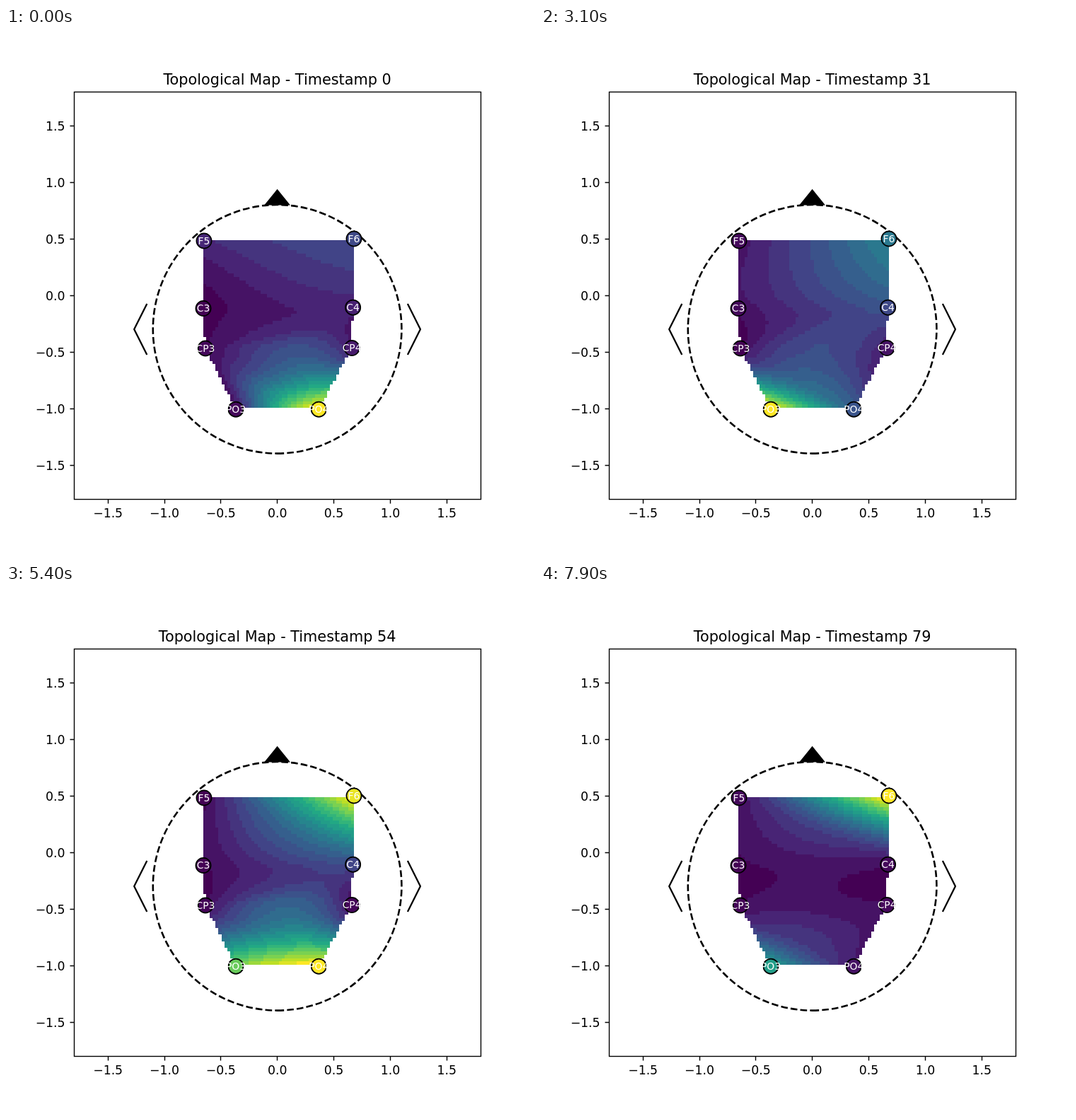
These frames come from a looping animation (748 by 748 pixels, 8000 ms). An HTML page with a canvas:

```html
<!DOCTYPE html>
<html lang="en">
<head>
<meta charset="utf-8">
<title>Topological Map</title>
<style>
  html, body { margin: 0; width: 100%; height: 100%; overflow: hidden; background: #fff; }
  canvas, svg { position: absolute; left: 0; top: 0; width: 748px; height: 748px; }
  text { font-family: "DejaVu Sans", sans-serif; font-size: 17.3px; text-anchor: middle; }
  .end { text-anchor: end; }
  .title { font-size: 20.8px; }
  .name { font-size: 13.85px; fill: #fff; }
  .line { fill: none; stroke: #000; }
</style>
</head>
<body>
<canvas id="heat" width="748" height="748"></canvas>
<svg id="plot" viewBox="0 0 748 748">
  <rect class="line" x="96.5" y="90.5" width="575" height="576" stroke-width="1.39"/>
  <path class="line" d="M383.6 601.6A175.8 175.8 0 0 0 383.6 250A175.8 175.8 0 0 0 383.6 601.6" stroke-width="2.6" stroke-dasharray="9.61 4.15"/>
  <path d="M365.2 250.5L383.6 227.8L402 250.5Z"/>
  <path class="line" d="M199.3 389.9L181.2 425.9L199.3 461.9M567.9 389.9L585.9 425.9L567.9 461.9" stroke-width="2.3" stroke-linejoin="round"/>
  <text id="title" class="title" x="383.6" y="80"></text>
</svg>
<script>
const names = ["F5", "F6", "C3", "C4", "CP3", "CP4", "PO3", "PO4"];
const pts = [[280, 301], [492, 298], [279, 396.5], [490.6, 395.2],
             [282, 453], [489.1, 452.5], [325, 539.2], [442.3, 539.2]];
const tris = [[0, 1, 3], [0, 3, 2], [2, 3, 4], [3, 5, 4], [4, 5, 7], [4, 7, 6]];

// Step number, then one level per electrode
const keys = [
  [0, .11, .22, 0, .09, .02, .07, .02, 1],
  [10, .02, .33, 0, .17, .03, .02, .33, 1],
  [19, .02, 1, .02, .13, 0, .12, .77, .12],
  [31, .02, .4, .02, .22, 0, .05, 1, .26],
  [46, 0, .73, 0, .24, .03, .01, .1, 1],
  [63, .02, .58, .02, .04, 0, .03, 1, .32],
  [79, .02, 1, 0, .02, .01, .02, .55, .05]
];

const stops = ["440154", "482475", "414487", "355f8d", "2a788e", "21918c",
               "22a884", "44bf70", "7ad151", "bddf26", "fde725"]
  .map(h => [0, 2, 4].map(i => parseInt(h.slice(i, i + 2), 16)));

function viridis(t) {
  const p = Math.min(1, Math.max(0, t)) * 10, i = Math.min(9, Math.floor(p));
  return `rgb(${stops[i].map((c, n) => Math.round(c + (stops[i + 1][n] - c) * (p - i)))})`;
}

const svg = document.getElementById("plot");
const title = document.getElementById("title");
const ctx = document.getElementById("heat").getContext("2d");

function add(tag, attrs, text = "") {
  const el = document.createElementNS("http://www.w3.org/2000/svg", tag);
  for (const a in attrs) el.setAttribute(a, attrs[a]);
  el.textContent = text;
  return svg.appendChild(el);
}

for (let n = -3; n <= 3; n++) {
  const label = (n < 0 ? "\u2212" : "") + Math.abs(n / 2).toFixed(1);
  const x = 383.7 + 79.85 * n, y = 378.5 - 80 * n;
  add("path", { class: "line", "stroke-width": 1.39, d: `M${Math.floor(x) + .5} 666.5v6M96.5 ${y}h-6` });
  add("text", { x, y: 692.2 }, label);
  add("text", { class: "end", x: 83.6, y: y + 6.3 }, label);
}
const dots = pts.map(([cx, cy]) => add("circle", { cx, cy, r: 10.6, stroke: "#000", "stroke-width": 1.73 }));
pts.forEach(([x, y], i) => add("text", { class: "name", x, y: y + 4.9 }, names[i]));

const sub = (a, b) => [a[0] - b[0], a[1] - b[1]];
const dot = (a, b) => a[0] * b[0] + a[1] * b[1];
const cross = (a, b) => a[0] * b[1] - a[1] * b[0];

function bary(tri, p) {
  const [a, b, c] = tri.map(i => pts[i]);
  const area = cross(sub(b, a), sub(c, a));
  const u = cross(sub(b, p), sub(c, p)) / area, v = cross(sub(c, p), sub(a, p)) / area;
  return [u, v, 1 - u - v];
}

const links = pts.map((_, i) =>
  [...new Set(tris.filter(t => t.includes(i)).flat())].filter(j => j !== i));

// Cross-edge slope weights of every triangle, one per side
const sides = tris.map(tri => tri.map((_, k) => {
  const i = (k + 1) % 3, j = (k + 2) % 3;
  const next = tris.find(t => t !== tri && t.includes(tri[i]) && t.includes(tri[j]));
  if (!next) return -.5;
  const mid = [0, 1].map(d => next.reduce((s, n) => s + pts[n][d] / 3, 0));
  const c = bary(tri, mid);
  return (2 * c[j] + c[i] - 1) / (2 - 3 * c[j] - 3 * c[i]);
}));

const grid = 50, cellW = 213.2 / grid, cellH = 237 / grid;
const cells = [];
for (let row = 0; row < grid; row++) {
  for (let col = 0; col < grid; col++) {
    const x = 279 + cellW * col, y = 300 + cellH * row;
    for (let t = 0; t < tris.length; t++) {
      const b = bary(tris[t], [x + cellW / 2, y + cellH / 2]);
      if (Math.min(...b) < 0) continue;
      const left = Math.round(x), top = Math.round(y);
      cells.push({ t, b, box: [left, top, Math.round(x + cellW) - left, Math.round(y + cellH) - top] });
      break;
    }
  }
}

// Gradients that keep the curvature along all edges smallest
function gradients(f) {
  const g = pts.map(() => [0, 0]);
  for (let pass = 0; pass < 60; pass++) {
    pts.forEach((p, i) => {
      let xx = 0, xy = 0, yy = 0, sx = 0, sy = 0;
      for (const j of links[i]) {
        const e = sub(pts[j], p), w = 1 / Math.hypot(...e) ** 3;
        const s = (6 * (f[j] - f[i]) - 2 * dot(e, g[j])) * w;
        xx += 4 * e[0] * e[0] * w;
        xy += 4 * e[0] * e[1] * w;
        yy += 4 * e[1] * e[1] * w;
        sx += s * e[0];
        sy += s * e[1];
      }
      const det = xx * yy - xy * xy;
      g[i] = [(yy * sx - xy * sy) / det, (xx * sy - xy * sx) / det];
    });
  }
  return g;
}

// Clough-Tocher cubic patch
function patch(tri, side, values, grads) {
  const f = tri.map(i => values[i]);
  const e = tri.map((a, i) => tri.map(b => f[i] + dot(grads[a], sub(pts[b], pts[a])) / 3));
  const v = f.map((_, i) => (e[i][0] + e[i][1] + e[i][2]) / 3);
  const m = f.map((_, k) => {
    const i = (k + 1) % 3, j = (k + 2) % 3;
    return (side[k] * (-f[i] + 3 * e[i][j] - 3 * e[j][i] + f[j])
      - f[i] + 2 * e[i][j] - e[j][i] + v[i] + v[j]) / 2;
  });
  const n = v.map((a, i) => (a + m[(i + 1) % 3] + m[(i + 2) % 3]) / 3);
  const mid = (n[0] + n[1] + n[2]) / 3;
  return bc => {
    const low = Math.min(...bc), b = bc.map(x => x - low), q = 3 * low;
    let sum = q ** 3 * mid;
    for (let i = 0; i < 3; i++) {
      const j = (i + 1) % 3, k = (i + 2) % 3;
      sum += b[i] ** 3 * f[i] + 3 * b[i] ** 2 * (b[j] * e[i][j] + b[k] * e[i][k] + q * v[i])
        + 6 * b[j] * b[k] * q * m[i] + 3 * b[i] * q * q * n[i];
    }
    return sum;
  };
}

function normalize(list) {
  const low = Math.min(...list), span = Math.max(...list) - low;
  return list.map(x => (x - low) / span);
}

function levels(step) {
  const i = Math.max(0, keys.findIndex(k => k[0] >= step) - 1);
  const a = keys[i], b = keys[i + 1], u = (step - a[0]) / (b[0] - a[0]);
  return normalize(a.slice(1).map((x, n) => x + (b[n + 1] - x) * u));
}

function draw(step) {
  const f = levels(step), g = gradients(f);
  const patches = tris.map((tri, t) => patch(tri, sides[t], f, g));
  const field = normalize(cells.map(c => patches[c.t](c.b)));
  ctx.clearRect(0, 0, 748, 748);
  cells.forEach((c, i) => {
    ctx.fillStyle = viridis(Math.round(field[i] * 20) / 20);
    ctx.fillRect(...c.box);
  });
  dots.forEach((d, i) => d.setAttribute("fill", viridis(f[i])));
  title.textContent = "Topological Map - Timestamp " + step;
}

const start = performance.now();
let shown = -1;
function tick() {
  const step = Math.floor((performance.now() - start) % 8000 / 100);
  if (step !== shown) draw(shown = step);
  requestAnimationFrame(tick);
}
tick();
</script>
</body>
</html>
```
